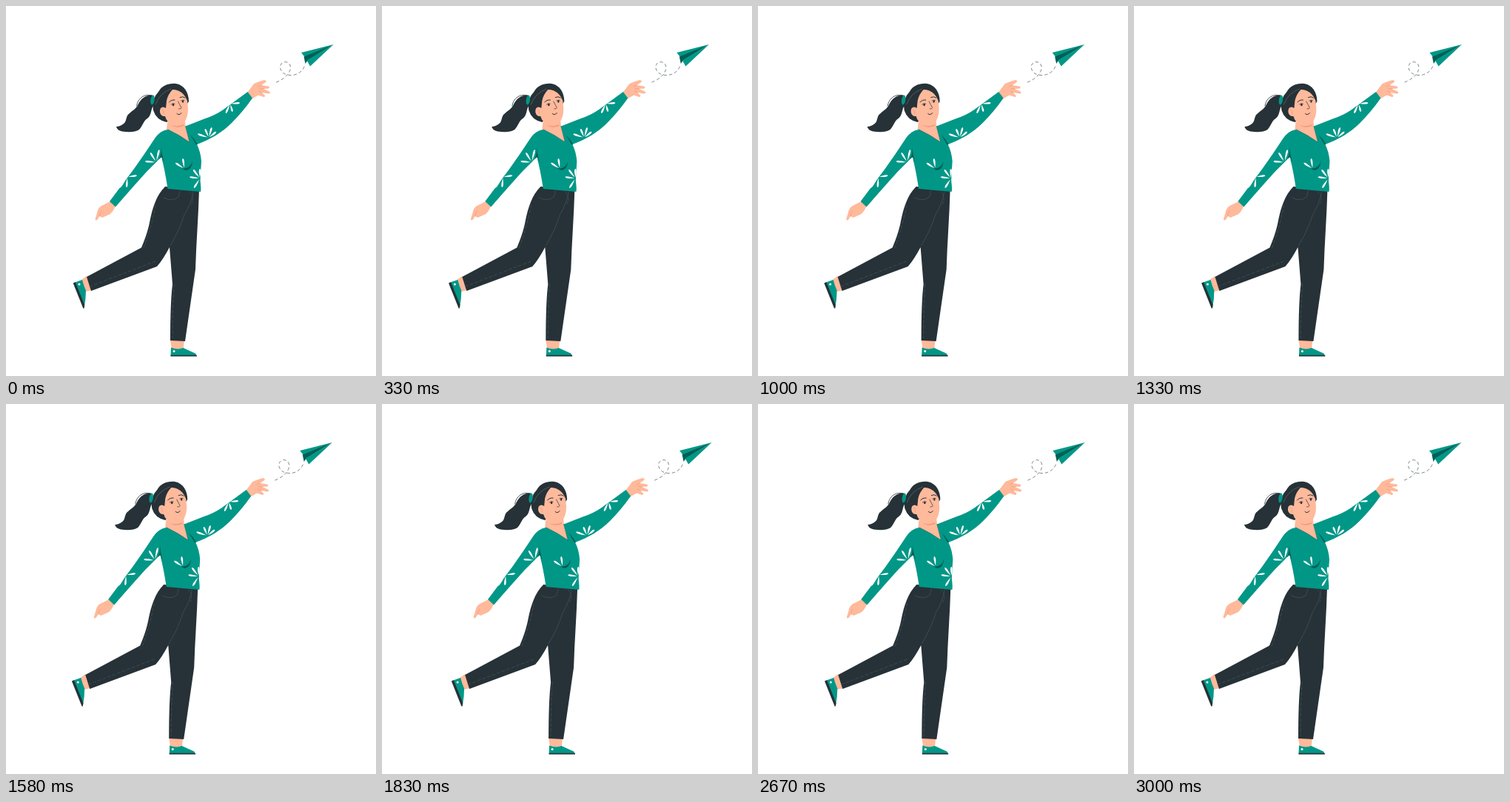
Write an HTML page with a canvas that moves like this. It is 500x500 px and loops after 3040 ms.

```html
<!DOCTYPE html>
<html lang="en">
<head>
<meta charset="utf-8">
<title>Paper plane</title>
<style>
  html, body { margin: 0; width: 100%; height: 100%; overflow: hidden; background: #fff; }
  canvas { display: block; width: 500px; height: 500px; }
</style>
</head>
<body>
<canvas id="stage"></canvas>
<script>
const canvas = document.getElementById('stage');
const ctx = canvas.getContext('2d');
const ratio = window.devicePixelRatio || 1;
canvas.width = canvas.height = 500 * ratio;

const TEAL = '#019787', DEEP = '#005f55', DARK = '#263238', SKIN = '#ffb99b', BLUSH = '#f0997c', SEAM = '#4a595f';
const LOOP = 3040, SHAKE = 3000, FPS = 24;
const offsets = [0, -1, 2, -4, 4, -4, 4, -4, 2, -1, 0];

function fill(d, color) {
  ctx.fillStyle = color;
  ctx.fill(new Path2D(d));
}

function line(d, color, width, dash = []) {
  ctx.strokeStyle = color;
  ctx.lineWidth = width;
  ctx.setLineDash(dash);
  ctx.stroke(new Path2D(d));
  ctx.setLineDash([]);
}

function oval(x, y, rx, ry, angle, color) {
  ctx.fillStyle = color;
  ctx.beginPath();
  ctx.ellipse(x, y, rx, ry, angle, 0, Math.PI * 2);
  ctx.fill();
}

// Leaf growing from (x, y) by (dx, dy), widest past its middle
function leaf(x, y, dx, dy) {
  const w = 2.1 / Math.hypot(dx, dy);
  const px = -dy * w, py = dx * w;
  ctx.fillStyle = '#fff';
  ctx.beginPath();
  ctx.moveTo(x, y);
  ctx.bezierCurveTo(x + dx * .5 + px * .6, y + dy * .5 + py * .6, x + dx * .9 + px, y + dy * .9 + py, x + dx, y + dy);
  ctx.bezierCurveTo(x + dx * .9 - px, y + dy * .9 - py, x + dx * .5 - px * .6, y + dy * .5 - py * .6, x, y);
  ctx.fill();
}

function sprig(x, y, tips) {
  for (const [dx, dy] of tips) leaf(x + dx * .1, y + dy * .1, dx * .9, dy * .9);
}

function plane() {
  fill('M399 63L442.5 52L404.5 70Z', TEAL);
  fill('M402.500 68.5L442.5 52L407.5 73.5L404.5 78Z', DEEP);
  fill('M406.500 73.5L442.5 52L411 81.5Z', TEAL);
  line('M403 82C399 91 390 95 380 93C372 91 369 84 371.500 79C374 74 383 74 384.500 82C385 92 374 100 364 103.500', '#46525a', .7, [3.5, 4]);
}

function hands() {
  fill('M141 264L129 270Q124 273 123 280L120.500 288Q121.500 291 124 288L126.500 284L130 286L139 282Q144 280 148 270Z', SKIN);
  line('M126.500 284Q126 279 129 277', BLUSH, .7);
  fill('M326 117L335 105Q341 102 349 100Q353 101 351 103L345 107L355 108.500Q357 110 355 111.500L348 112L356 115.500Q358 118 355 118.500L346 117L350 121Q350 124 347 122.500L341 120.500L333 125Z', SKIN);
  line('M345 107L341 109M348 112L343 111.500M346 117L342 115', BLUSH, .7);
}

function legs() {
  fill('M109 365L102 370L107 386L116 384Z', SKIN);
  fill('M91.500 374L103 370Q105 378 108 384.500Q108 396 105.500 408.500Z', TEAL);
  fill('M90.700 374.500L93.800 373.300L106.200 404L105.500 408.500L104.300 408.500Z', DARK);
  oval(99, 376, 1.5, 1.5, 0, '#fff');

  fill('M222 451L241 451L239.500 464L224 464Z', SKIN);
  fill('M223 461.500Q232 465 239.500 462Q248 466 256 469.500L258 473L222.500 473Z', TEAL);
  fill('M222.500 471.700L257.500 471.700L258 473.500L222.500 473.500Z', DARK);
  oval(227, 466.500, 1.5, 1.5, 0, '#fff');

  fill('M215 244C203 256 198 273 194.500 290C192 304 187 317 183 326.500L109 366L115 385L204 352Q212 343 221 326L225 376Q222 400 222 452L242 453L256 356C257 320 260 285 261 248Z', DARK);
  line('M213 259Q225 265 233 258L235 250M253 251Q250 268 241 282Q235 302 222 324', SEAM, .6);
  line('M248 251Q256 258 250 269', SEAM, .6, [3, 2]);
  line('M113 379L202 345M186 327Q197 297 202 270', SEAM, .6, [4, 3]);
  line('M227 376Q225 410 225 448', SEAM, .6, [4, 3]);
}

function sweater() {
  fill('M218 157L242 155Q242 165 249 186L235 180L217 167Z', SKIN);
  fill('M223 161Q232 164 240 160L240 162Q230 166 223 161Z', BLUSH);
  fill('M219 167C211 168 206 172 201 179L187 200L173 220L140 264L148 271.500Q171 245 190 224L210 204Q215 223 218.500 247Q240 249 263 251Q264 248 262.500 236Q263 224 264 210Q263 197 258 187C275 181 292 171 305 158Q320 143 333 124.500L326.500 116L293 140.500Q282 148 268 152.500L242.500 162.500L248 184Q234 174 219 167Z', TEAL);
  line('M219 167Q234 174 248 184L242.500 162.500', DEEP, .5);
  fill('M210 190Q210 201 214 211L210 204L207 207Q210 200 210 190Z', DEEP);
  fill('M236 219Q248 222 252 210Q251 221 243 222Z', DEEP);
  fill('M249 174Q255 180 259 187L257 187.500Z', DEEP);

  sprig(164, 231, [[-11, 15], [-1, 14], [13, -2], [-3, -5]]);
  sprig(203, 211, [[-15, -1], [-8, -13], [4, -17], [8, -5]]);
  sprig(241, 220, [[-12, -8], [-2, -14]]);
  sprig(262, 233, [[-9, -12], [-14, -2], [-8, 13], [0, -13]]);
  sprig(274, 178, [[-15, -5], [-5, -12], [4, -14], [10, -8]]);
  sprig(303, 132, [[-6, 13], [3, 11], [13, -1], [-6, -3]]);
}

function head() {
  fill('M199 121C190 119 183 125 179 132C176 139 171 141 167 145C161 149 164 155 159 159Q154 163 149 163Q150 168 157 169.500Q172 172 180 167C185 162 185 156 191 152C197 148 195 140 200 133Z', DARK);
  line('M197 121C188 118 178 124 176.500 135', DARK, .8);
  fill('M206 116C211 107 220 104 230 105C241 107 247 117 247 129L240 140L217 157Q203 154 199 141Q196 126 206 116Z', DARK);
  fill('M225 113Q219 119 217 128L216 138Q212 135 209 138C206 144 210 150 215 149Q217 157 225 160Q234 162 240 158Q246 151 246 139L245 128Q241 118 233 114.500Q229 112.500 225 113Z', SKIN);
  oval(198, 127, 2.6, 6.5, .15, TEAL);
  line('M202 133Q207 118 223 112', '#69767b', .6);
  line('M211 140Q214 141 213 146', BLUSH, .8);
  line('M220.500 130Q223 126.500 228 127M235 123.500Q239 121.500 242 124', DARK, 1);
  oval(226, 133.500, 1.3, 1.8, 0, DARK);
  oval(239, 129, 1.2, 1.7, 0, DARK);
  line('M223 133Q225 131 228 132M236.500 128Q239 126.500 241 127.500', DARK, .7);
  line('M232.500 129Q235 134 237 137.500Q236.500 139.500 233.500 139', DARK, .7);
  line('M231 145.500Q234 148.500 237 144.500', DARK, 1);
}

function shakeAt(ms) {
  const pos = Math.min(ms / SHAKE, 1) * (offsets.length - 1);
  const i = Math.min(Math.floor(pos), offsets.length - 2);
  return offsets[i] + (offsets[i + 1] - offsets[i]) * (pos - i);
}

function draw(now) {
  const step = Math.floor(((now % LOOP) + 4) * FPS / 1000);
  ctx.setTransform(ratio, 0, 0, ratio, 0, 0);
  ctx.fillStyle = '#fff';
  ctx.fillRect(0, 0, 500, 500);
  ctx.translate(shakeAt(step * 1000 / FPS), 0);
  ctx.lineCap = ctx.lineJoin = 'round';
  plane();
  hands();
  legs();
  sweater();
  head();
}

const start = performance.now();
function tick() {
  draw(performance.now() - start);
  requestAnimationFrame(tick);
}
tick();
</script>
</body>
</html>
```
